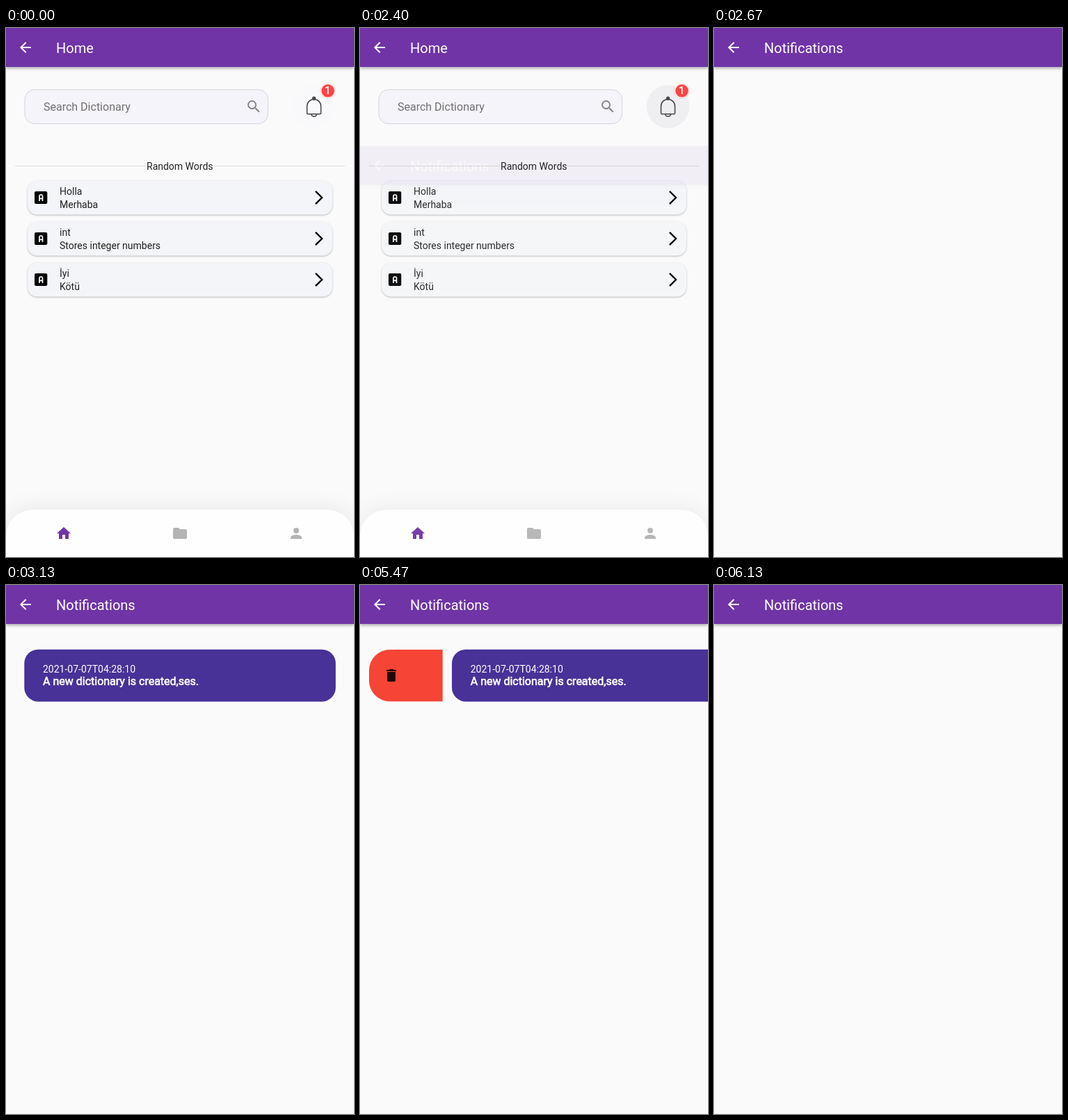
Write an HTML page that moves like this. It is 500 px wide and 761 px high and loops after 6530 ms.

```html
<!DOCTYPE html>
<html lang="en">
<head>
<meta charset="utf-8">
<title>Dictionary app</title>
<style>
  html, body { margin: 0; width: 100%; height: 100%; overflow: hidden; background: #fafafa; }
  svg { display: block; width: 500px; height: 761px; }
  text { font: 14px Roboto, sans-serif; fill: #212121; white-space: pre; }
  .bar rect { fill: #7034a6; filter: drop-shadow(0 2px 2px #0005); }
  .bar text { font-size: 20px; fill: #fff; }
  .bar path { fill: #fff; }
  .line { fill: none; stroke: #484848; stroke-width: 1.6; }
  .row { fill: #f4f5f8; filter: drop-shadow(0 1px 1px #0004); }
  .chevron { fill: none; stroke: #000; stroke-width: 2.4; }
  .nav { fill: #fefefe; filter: drop-shadow(0 -3px 14px #00000012); }
  .card text { fill: #fff; }
  .card .bold { font-size: 16px; stroke: #fff; stroke-width: .6px; }
</style>
</head>
<body>
<svg viewBox="0 0 500 761">
  <defs>
    <path id="back" d="M20 11H7.83l5.59-5.59L12 4l-8 8 8 8 1.41-1.41L7.83 13H20z"/>
    <clipPath id="window"><rect id="hole" x="13" y="93"/></clipPath>
  </defs>

  <g id="home">
    <rect width="500" height="761" fill="#fafafa"/>
    <g class="bar">
      <rect width="500" height="56"/>
      <use href="#back" x="16" y="16" fill="#fff"/>
      <text x="72" y="36">Home</text>
    </g>

    <rect x="27" y="88.7" width="349.5" height="49" rx="14" fill="#f6f4fb" stroke="#d4d2da"/>
    <text x="54" y="119" style="font-size:16px;fill:#717074">Search Dictionary</text>
    <path transform="translate(344 101)" fill="#858488" d="M15.5 14h-.79l-.28-.27A6.47 6.47 0 0 0 16 9.5 6.5 6.5 0 1 0 9.5 16c1.61 0 3.09-.59 4.23-1.57l.27.28v.79l5 4.99L20.49 19zm-6 0a4.5 4.5 0 1 1 0-9 4.5 4.5 0 0 1 0 9z"/>

    <circle cx="442.5" cy="113" r="31" fill="#f9f8fb"/>
    <circle id="press" cx="442.5" cy="113" r="31"/>
    <circle cx="442.5" cy="101.3" r="2.7" fill="#484848"/>
    <path class="line" d="M434 123.7q-1.5 0-1.5-1.5V112.500a10 10 0 0 1 20 0V122.200q0 1.500-1.500 1.500zM438.800 124a3.800 3.300 0 0 0 7.600 0"/>
    <circle cx="462.500" cy="90.300" r="10.800" fill="#fff" stroke="#f3c6c8" stroke-width=".8"/>
    <circle cx="462.500" cy="90.300" r="9.300" fill="#fe4343"/>
    <text x="462.300" y="95.300" text-anchor="middle" style="fill:#fff;stroke:#fff;stroke-width:.4px">1</text>

    <path d="M13 198.500H202M297.500 198.500H487" stroke="#dcdcdc"/>
    <text x="202" y="204">Random Words</text>
    <g id="rows"></g>

    <path class="nav" d="M0 761V731a38 38 0 0 1 38-38H462a38 38 0 0 1 38 38v30z"/>
    <path transform="translate(71 715)" fill="#7034a6" d="M10 20v-6h4v6h5v-8h3L12 3 2 12h3v8z"/>
    <path transform="translate(238 715)" fill="#b4b4b4" d="M10 4H4a2 2 0 0 0-2 2v12a2 2 0 0 0 2 2h16a2 2 0 0 0 2-2V8a2 2 0 0 0-2-2h-8z"/>
    <path transform="translate(405 715)" fill="#b4b4b4" d="M12 12a4 4 0 1 0 0-8 4 4 0 0 0 0 8zm0 2c-2.670 0-8 1.340-8 4v2h16v-2c0-2.660-5.330-4-8-4z"/>
  </g>

  <g id="notes">
    <rect width="500" height="761" fill="#fafafa"/>
    <g class="bar">
      <rect width="500" height="56"/>
      <use href="#back" x="16" y="16" fill="#fff"/>
      <text x="72" y="36">Notifications</text>
    </g>
    <g clip-path="url(#window)">
      <g id="bin">
        <rect x="13" y="93" width="474" height="74.500" rx="30" fill="#f64436"/>
        <path transform="translate(33 118)" fill="#1f0907" d="M6 19a2 2 0 0 0 2 2h8a2 2 0 0 0 2-2V7H6zM19 4h-3.500l-1-1h-5l-1 1H5v2h14z"/>
      </g>
    </g>
    <g id="card" class="card">
      <rect x="26.300" y="92.700" width="447.400" height="75" rx="20" fill="#483197"/>
      <text x="53" y="126">2021-07-07T04:28:10</text>
      <text class="bold" x="53" y="144">A new dictionary is created,ses.</text>
    </g>
  </g>
</svg>
<script>
const $ = id => document.getElementById(id);
const set = (el, attrs) => { for (const k in attrs) el.setAttribute(k, attrs[k]); };
const clamp = x => Math.min(1, Math.max(0, x));
const LOOP = 6530, STEP = 1000 / 15, WIDTH = 474, HEIGHT = 75;

const words = [['Holla', 'Merhaba'], ['int', 'Stores integer numbers'], ['İyi', 'Kötü']];
$('rows').innerHTML = words.map(([word, meaning], i) => `
  <g transform="translate(0 ${i * 59})">
    <rect class="row" x="31" y="219.500" width="438" height="49" rx="14"/>
    <rect x="41" y="235" width="18.300" height="18" rx="2"/>
    <path d="M48 249V241.500L49 240H51.500L52.500 241.500V249M48 245.300H52.500" fill="none" stroke="#fff" stroke-width="1.700"/>
    <text x="77" y="240">${word}</text>
    <text x="77" y="259">${meaning}</text>
    <path class="chevron" d="M444.800 234.800L454 244L444.800 253.200"/>
  </g>`).join('');

// CSS-style cubic Bézier easing, solved by bisection
const bezier = (x1, y1, x2, y2) => x => {
  if (x <= 0 || x >= 1) return clamp(x);
  const at = (a, b, u) => 3 * a * u * (1 - u) ** 2 + 3 * b * u * u * (1 - u) + u ** 3;
  let lo = 0, hi = 1;
  for (let i = 0; i < 30; i++) {
    const mid = (lo + hi) / 2;
    if (at(x1, x2, mid) < x) lo = mid; else hi = mid;
  }
  return at(y1, y2, lo);
};
const fastOutSlowIn = bezier(.4, 0, .2, 1);
const easeIn = bezier(.42, 0, 1, 1);
const ease = bezier(.25, .1, .25, 1);

// Finger drag, then a quick fling off the edge
function swipe(t) {
  if (t < 5190) return 0;
  if (t > 5790) return WIDTH;
  return 6 + 302 * clamp((t - 5200) / 533) ** 1.6;
}

function draw(t) {
  const hover = .01 * clamp((t - 1800) / 260);
  $('press').setAttribute('opacity', hover + (t > 2320 ? .03 : 0));

  // The next page rises a quarter of the height while fading in
  const p = clamp((t - 2345) / 300);
  set($('notes'), {
    opacity: easeIn(p),
    transform: `translate(0 ${761 / 4 * (1 - fastOutSlowIn(p))})`
  });

  const dx = swipe(t);
  set($('card'), {
    transform: `translate(${dx} 0)`,
    visibility: t > 3125 && dx < WIDTH ? 'visible' : 'hidden'
  });

  const left = HEIGHT * (1 - ease(clamp((t - 5945) / 180)));
  set($('hole'), { width: dx, height: left });
  $('bin').setAttribute('transform', `translate(0 ${(left - HEIGHT) / 2})`);
}

const start = performance.now();
function tick() {
  const t = (performance.now() - start) % LOOP;
  draw(Math.floor((t + 4) / STEP) * STEP);
  requestAnimationFrame(tick);
}
tick();
</script>
</body>
</html>
```
